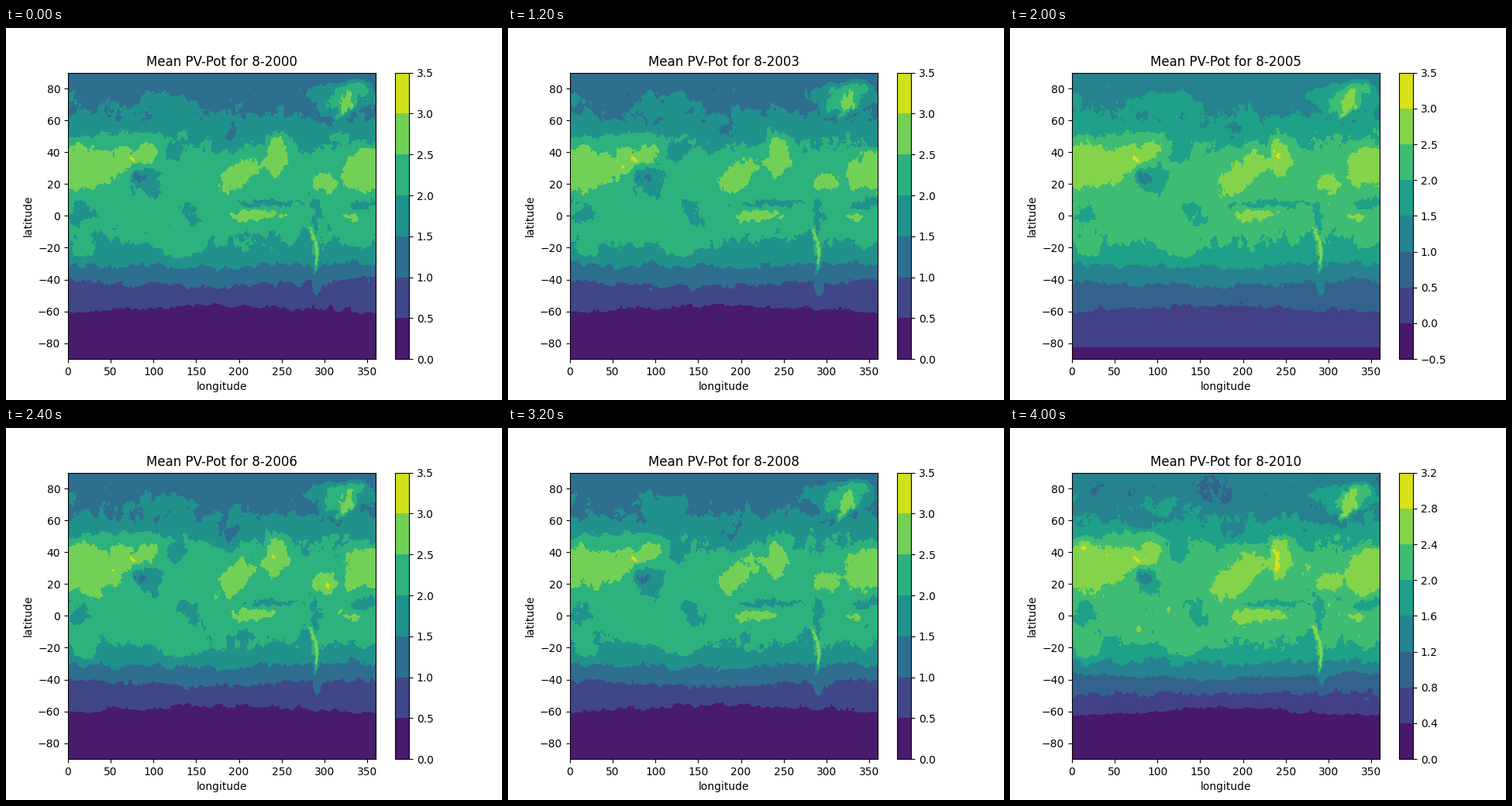
Animation of 640x480 px, one loop 4400 ms. Source, as a matplotlib script:

```python
import numpy as np
import matplotlib.pyplot as plt
from matplotlib.animation import FuncAnimation

LON, LAT = np.meshgrid(np.linspace(0, 359.75, 720), np.linspace(-90, 90, 361))
YEARS = range(2000, 2011)
BLUE, TEAL, GREEN, SUN = 1.42, 1.8, 2.22, 2.74

# Zonal mean: latitude and value
PROFILE = np.array([(-90, .03), (-62, .3), (-57.5, .5), (-42, 1), (-31, 1.5), (-17, 2),
                    (-7, 2.2), (34, 2.22), (44, 2), (64, 1.5), (76, 1.26), (90, 1.26)])

# Soft ellipses in painting order: lon, lat, half width, half height, value, tilt
REGIONS = {
    "Siberia": (110, 70, 40, 7, 1.62, 0),
    "North Pacific": (188, 53, 16, 8, BLUE, 0),
    "Central Asia": (75, 47, 45, 6, GREEN, 0),
    "Sahara": (15, 29, 51, 14.5, SUN, 0),
    "Iran": (61, 36, 14, 8, SUN, 25),
    "Tibet": (88, 38, 15, 7, SUN, 15),
    "China": (122, 40, 12, 9, TEAL, 0),
    "monsoon": (95, 21, 23, 11, TEAL, 0),
    "India": (85, 23, 9, 5, BLUE, 0),
    "Rockies": (246, 46, 14, 8, GREEN, 0),
    "California": (244, 37, 13, 13, SUN, 0),
    "Pacific high": (199, 25, 29, 10, SUN, 15),
    "Caribbean": (302, 21, 17, 5, SUN, 10),
    "Atlantic high": (345, 30, 20, 12, SUN, 20),
    "South Africa": (20, -17, 12, 12, GREEN, 0),
    "Australia": (131, -18, 23, 9, GREEN, 0),
    "Congo": (15, 1, 13, 8, TEAL, 0),
    "Indonesia": (143, 1, 17, 8, TEAL, -15),
    "Pacific rain belt": (240, 8, 40, 2.6, TEAL, 0),
    "Atlantic rain belt": (345, 8, 16, 3.5, 1.7, 0),
    "Amazon": (288, 0, 8, 13, TEAL, 0),
    "Peru current": (279, -16, 10, 8, TEAL, -30),
    "Pacific equator": (217, 0, 33, 3.7, SUN, 0),
    "Atlantic equator": (334, 0, 9, 2.2, SUN, 0),
    "Patagonia": (291, -43, 4.5, 7, 1.2, 0),
    "Labrador": (308, 59, 14, 5, BLUE, -20),
    "Greenland coast": (319, 76, 43, 7, TEAL, 0),
    "Greenland": (324, 74, 23, 8, GREEN, 15),
    "Greenland ice": (321, 70, 12, 5, SUN, 48),
}


def noise(seed):
    """Rough fractal texture, stretched along the longitude."""
    rows, cols = LON.shape
    spectrum = np.fft.fft2(np.random.default_rng(seed).standard_normal((rows, cols)))
    kx, ky = np.meshgrid(np.fft.fftfreq(cols, 0.5), np.fft.fftfreq(rows, 0.5))
    texture = np.fft.ifft2(spectrum / ((1.4 * kx) ** 2 + ky ** 2 + 0.0016) ** 0.8).real
    return (texture - texture.mean()) / texture.std()


def blend(field, distance, value):
    return field + (value - field) * np.exp(-distance ** 4)


def ellipse(x, y, lon, lat, rx, ry, tilt=0):
    """Distance from a centre, equal to 1 on the ellipse."""
    dx, dy = (x - lon + 180) % 360 - 180, y - lat
    c, s = np.cos(np.radians(tilt)), np.sin(np.radians(tilt))
    return np.hypot((c * dx + s * dy) / rx, (c * dy - s * dx) / ry)


def zonal_mean(y):
    """Bands of the profile, swinging one way in mid-latitudes and the other at the ice."""
    swing = np.interp(LAT, [-60, -42, 0], [-2.4, 2, 0])
    return np.interp(y - swing * np.cos(np.radians(LON + 10)), *PROFILE.T)


def pv_field(year, levels):
    rng = np.random.default_rng(year)
    texture = 0.6 * noise(7) + 0.8 * noise(year)
    calm = np.interp(LAT, [-45, -20, 78, 87], [0, 1, 1, 0.2])
    x = LON + 2.2 * calm * noise(11)
    y = LAT + 1.2 * calm * noise(12)

    field = zonal_mean(y)
    for lon, lat, rx, ry, value, tilt in REGIONS.values():
        drift, grow = rng.normal(0, 0.06, 2), rng.uniform(0.92, 1.08)
        field = blend(field, ellipse(x, y, lon + drift[0] * rx, lat + drift[1] * ry,
                                     rx * grow, ry * grow, tilt), value)

    # The Andes follow a parabola between 5 and 34 degrees south
    ridge = 292 - 11 * ((LAT + 24) / 19) ** 2
    for width, value in ((4, GREEN), (2, SUN)):
        field = blend(field, np.hypot((x - ridge) / width, (LAT + 19) / 15), value)

    # Only the highest ground reaches the top band
    top = levels[-2]
    field = np.minimum(field, 0.92 * top)
    field = blend(field, ellipse(x, y, 75, 36, 4.5, 1.8, -20), top + 0.1)
    field = blend(field, ellipse(x, y, 242, 36, 2.5, 8, 10), 2.88)

    field += texture * np.interp(LAT, [-66, -58, -28, -18, 80, 87],
                                 [0, .045, .045, .085, .085, .03])
    if levels[0] < 0:
        field = np.where(LAT < -82.2, -0.05, field)
    return np.clip(field, levels[0] + 0.001, levels[-1] - 0.001)


def levels_for(year):
    if year == 2005:
        return np.linspace(-0.5, 3.5, 9)
    if year == 2010:
        return np.linspace(0, 3.2, 9)
    return np.linspace(0, 3.5, 8)


def draw(i):
    year = YEARS[i]
    levels = levels_for(year)
    fig.clf()
    ax = fig.add_subplot()
    filled = ax.contourf(LON, LAT, FIELDS[i], levels=levels, cmap="viridis")
    fig.colorbar(filled, ax=ax)
    ax.set(title=f"Mean PV-Pot for 8-{year}", xlabel="longitude", ylabel="latitude")
    return []


FIELDS = [pv_field(year, levels_for(year)) for year in YEARS]

fig = plt.figure(figsize=(6.4, 4.8), dpi=100)
anim = FuncAnimation(fig, draw, frames=len(YEARS), init_func=lambda: [],
                     interval=400, repeat=True, repeat_delay=0)
plt.show()
```
